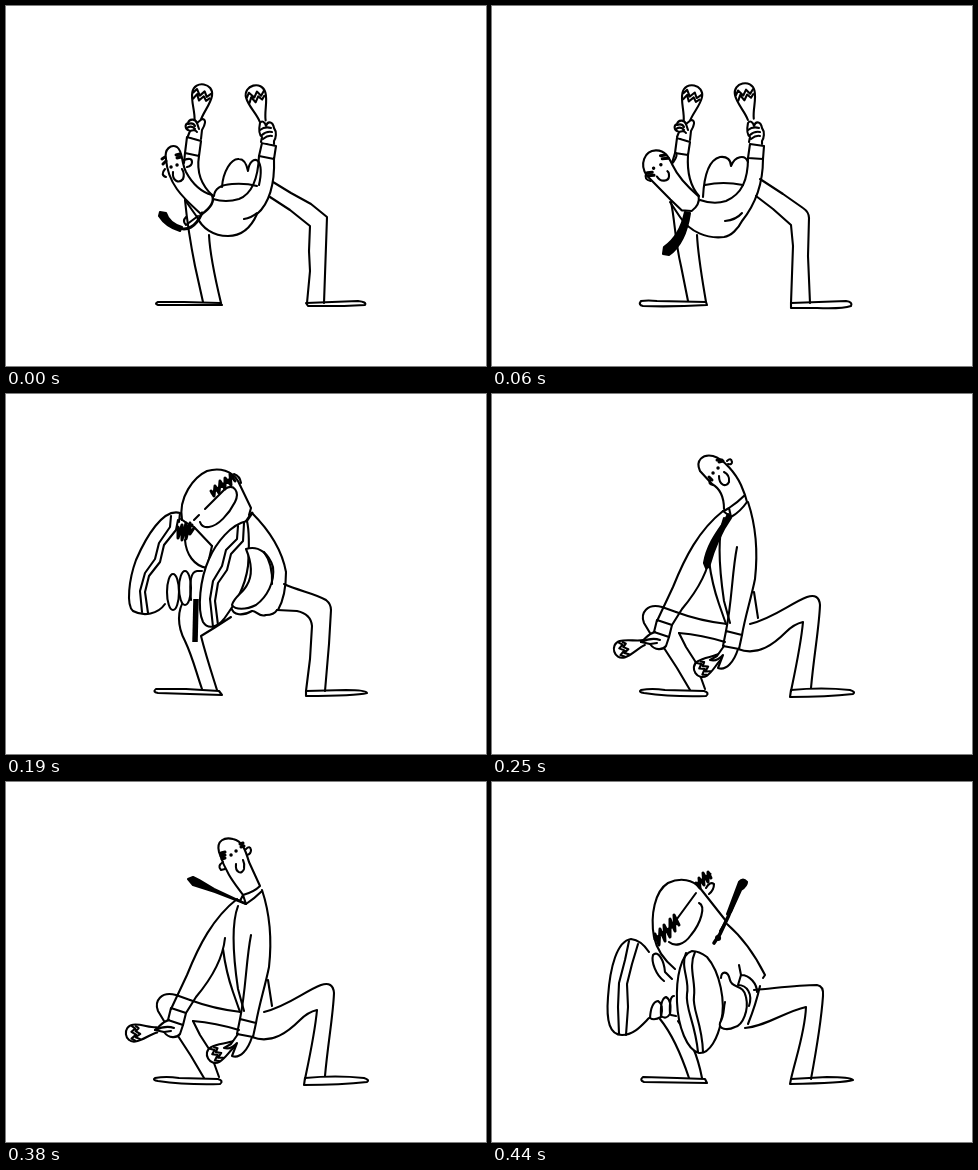
Recreate the animation shown at these times as an HTML page without scripts. Size 480 by 360 pixels, loop 0.5 s.

```html
<!DOCTYPE html>
<html lang="en">
<head>
<meta charset="utf-8">
<title>Maraca dance</title>
<style>
  html, body { margin: 0; width: 100%; height: 100%; overflow: hidden; background: #fff; }
  svg { display: block; width: 100vw; height: 100vh; overflow: hidden; }
  path, ellipse { vector-effect: non-scaling-stroke; }
  .ink { fill: none; stroke: #000; stroke-width: 2.1; stroke-linecap: round; stroke-linejoin: round; }
  .solid { fill: #000; }
  .paper { fill: #fff; }
  .hair { stroke-width: 3; }
  .dot { stroke-width: 3.4; }

  /* Poses sit side by side; the strip jumps one stage width at a time. */
  .strip { animation: dance .5s step-end infinite; }
  @keyframes dance {
    0% { transform: translateX(0); }
    12% { transform: translateX(-480px); }
    26% { transform: translateX(-960px); }
    38% { transform: translateX(-1440px); }
    50% { transform: translateX(-1920px); }
    62% { transform: translateX(-2400px); }
    76% { transform: translateX(-2880px); }
    88%, 100% { transform: translateX(-3360px); }
  }
</style>
</head>
<body>
<svg viewBox="0 0 480 360" preserveAspectRatio="none">
  <defs>
    <g id="maraca">
      <path class="paper" d="M-3 26C-4 17-10 8-10-1C-10-14 10-14 10-1C10 8 4 17 3 26"/>
      <path d="M-9-1L-6-5L-2 1L2-4L5 1L9-3M-8 5L-5 0L-2 6L2 1L5 5L8 2"/>
    </g>

    <g id="fistL">
      <path class="paper" d="M182 130L184 125C178 123 179 118 182 117C183 113 189 112 191 117L196 113C201 113 199 119 196 124L195 133"/>
      <path d="M182 118Q187 116 189 120M181 122Q186 119 189 123M184 125Q189 123 191 126M191 117L193 123"/>
    </g>

    <g id="fistR">
      <path class="paper" d="M255 136L256 131C252 128 253 122 254 117C256 114 259 116 260 120C262 114 267 116 268 122C271 126 270 132 268 135L268 138"/>
      <path d="M254 124Q259 120 265 122M256 129Q260 125 266 126M257 133Q262 129 266 130"/>
    </g>

    <g id="lean">
      <path d="M149 295Q156 294 165 295L214 296L215 299Q180 301 151 300Q146 299 149 295Z"/>
      <path d="M299 297L354 295Q361 296 359 300Q350 303 325 302L299 302Z"/>
      <path d="M179 196C183 215 183 235 189 260L196 295M205 229C206 250 210 272 214 296"/>
      <path d="M268 173L291 188L311 202Q317 206 317 212L316 250L318 297M264 190L281 203L299 219L301 240L299 297"/>
      <path d="M211 191C212 171 216 154 228 151C235 150 239 154 239 160C243 150 253 148 256 156M213 179Q231 175 251 179"/>
      <path d="M271 153C271 180 262 200 250 215C246 223 239 230 232 231C215 233 198 226 188 211L178 196"/>
      <path d="M256 152C256 174 250 188 234 195Q222 199 208 194M250 207Q244 214 233 215"/>
      <path d="M258 138L272 140L271 153L256 152ZM185 132L198 136L196 149L183 147Z"/>
      <path d="M183 147L180 157M196 149C195 165 198 180 207 190"/>
    </g>

    <g id="leanHead">
      <path d="M190 205L178 195L153 173C144 162 149 148 160 147C170 146 174 154 178 161C184 172 194 181 206 190Q208 198 200 205L190 205"/>
      <path d="M152 171Q150 177 157 178M178 158Q183 150 180 148M163 173C167 179 175 177 175 172Q175 168 173 167"/>
      <path class="hair" d="M153 170L158 169M154 173L160 172M165 152L170 151M167 155L173 154"/>
      <path class="dot" d="M159 165h.1M166 161h.1"/>
    </g>

    <g id="squat">
      <path d="M149 296Q160 294 173 296L212 297Q218 299 214 302Q180 303 152 299Q146 298 149 296Z"/>
      <path d="M299 296Q330 293 358 296Q364 298 361 300Q335 303 298 303Z"/>
      <path d="M184 218L170 213C155 209 148 219 152 229L158 239M172 254L185 274L198 296M187 239L194 253L203 267L213 295"/>
      <path d="M184 218Q208 227 235 230M187 239Q210 241 233 248"/>
      <path d="M258 230C282 224 299 209 315 203Q327 199 328 211C327 235 322 260 319 294"/>
      <path d="M246 255C266 263 283 249 294 238Q302 230 311 228C309 250 304 273 299 297"/>
      <path d="M231 117C207 136 193 163 181 193L165 227M219 156C217 176 206 196 190 215L180 231"/>
      <path d="M217 167Q220 190 227 210L234 230M232 124C224 145 228 180 232 207L238 229"/>
      <path d="M256 108C264 132 266 158 263 185C259 205 253 223 250 241M245 153C240 178 240 208 234 237M262 198L266 224"/>
    </g>

    <g id="lowHands">
      <path class="paper" d="M163 238C155 240 155 244 149 248L158 250C163 257 171 256 174 252L177 243"/>
      <path d="M149 248Q160 243 168 246M158 250L165 249"/>
      <path class="paper" d="M232 252L225 262L218 266Q225 268 231 261L226 274C234 277 242 268 246 255"/>
      <path d="M165 226L180 231L177 243L162 238ZM234 237L250 241L247 255L231 252Z"/>
    </g>

    <g id="upHead">
      <path d="M237 113C229 102 220 92 213 70C210 58 219 55 227 57C237 59 240 70 243 80L254 104M232 118L240 122Q249 116 256 109M237 113Q248 110 254 104M237 113L234 119M237 113L240 122"/>
      <path d="M217 80Q211 84 215 88L219 87M240 67Q244 63 245 68Q245 72 241 73M230 82C229 91 236 93 238 87Q239 82 237 78"/>
      <path class="hair" d="M215 71L219 70M215 74L219 73M216 77L219 76M234 62L237 61M235 65L238 64"/>
      <path class="dot" d="M225 73h.1M230 69h.1"/>
    </g>
  </defs>

  <g class="strip ink">
    <!-- leaning back, tie flung out -->
    <g>
      <path d="M152 296L178 296L214 297L216 299L152 299Q148 298 152 296Z"/>
      <path d="M300 297L352 295Q361 296 359 299L338 300L302 300Z"/>
      <path d="M179 194C181 215 184 235 189 260L197 296M203 229C204 250 209 272 215 297"/>
      <path d="M267 176L285 187L305 198L321 211L320 240L318 297M264 191L284 204L304 220L303 245L304 265L301 297"/>
      <path d="M216 181C217 166 225 152 233 153C239 153 241 160 242 165C243 156 248 152 252 155C256 160 255 170 253 179M208 190Q209 179 226 178Q240 177 251 180"/>
      <path d="M268 153C269 178 263 198 251 208C244 224 233 230 222 230C207 230 196 222 191 211L179 194"/>
      <path d="M253 150C252 173 246 188 233 193Q220 197 207 193M251 207Q245 212 238 213"/>
      <path d="M256 137L270 140L268 153L253 150ZM181 131L195 135L193 150L179 147Z"/>
      <path d="M179 147L178 157M193 150C190 168 196 180 207 190"/>
      <use href="#maraca" transform="translate(196 89) rotate(10)"/>
      <use href="#maraca" transform="translate(250 90) rotate(-15)"/>
      <use href="#fistL"/>
      <use href="#fistR"/>
      <path d="M195 208C180 194 162 180 160 153C158 143 165 138 171 141C177 145 175 156 180 166C186 177 195 186 206 189"/>
      <path d="M159 163Q154 169 160 171M178 154Q186 151 186 156Q186 160 181 161M167 166C166 175 173 178 177 173Q179 168 176 163"/>
      <path class="hair" d="M156 153L159 151M157 158L160 155M170 149L174 148M171 152L175 151"/>
      <path class="dot" d="M165 161h.1M171 159h.1"/>
      <path d="M206 189Q210 198 196 208" stroke-width="2.5"/>
      <path d="M180 211Q176 215 180 219L192 210"/>
      <path d="M196 207C190 221 181 226 170 221" stroke-width="3"/>
      <path class="solid" d="M154 206L160 207Q163 217 176 221L174 225Q160 221 153 210Z"/>
    </g>

    <!-- leaning back, tie falling -->
    <g transform="translate(480)">
      <use href="#lean"/>
      <use href="#maraca" transform="translate(200 90) rotate(12)"/>
      <use href="#maraca" transform="translate(253 88) rotate(-13)"/>
      <use href="#fistL" x="3" y="1"/>
      <use href="#fistR" x="2"/>
      <use href="#leanHead" transform="rotate(4 200 200)"/>
      <path class="solid" d="M193 206L198 207C195 227 188 241 177 249L171 248L172 241C184 233 190 220 193 206Z"/>
    </g>

    <!-- leaning back, tie hanging -->
    <g transform="translate(960)">
      <use href="#lean"/>
      <use href="#maraca" transform="translate(205 91) rotate(18)"/>
      <use href="#maraca" transform="translate(256 87) rotate(-7)"/>
      <use href="#fistL" x="4" y="1"/>
      <use href="#fistR" x="3"/>
      <use href="#leanHead"/>
      <path class="solid" d="M193 205L196 206L197 225L199 256L196 262L191 256L193 225Z"/>
    </g>

    <!-- swinging forward, maracas close up -->
    <g transform="translate(1440)">
      <path d="M150 295L180 295L213 297L216 301L152 299Q146 298 150 295Z"/>
      <path d="M300 297L340 296Q360 296 361 299Q350 302 300 302Z"/>
      <path d="M179 205C171 216 171 232 179 247C187 264 190 278 196 295M195 242C200 262 206 280 211 296M195 242L208 234L225 223"/>
      <path d="M278 190C293 197 308 199 320 206Q325 210 325 216L323 250L319 297M271 216L291 217Q305 220 306 232L304 265L300 297"/>
      <path d="M225 213C227 222 237 222 246 217C250 216 253 224 260 221Q268 221 271 216"/>
      <path d="M246 119C263 136 276 156 280 178Q280 202 272 216"/>
      <path d="M246 119L235 135" stroke-width="3"/>
      <path d="M176 126C172 103 188 83 201 77C214 73 226 77 232 87L245 114L243 121"/>
      <path d="M188 126L193 121M199 115L219 95C228 89 234 98 229 108C223 120 212 132 203 133Q196 134 194 128M228 80Q234 82 235 89M175 125Q181 130 188 133L206 152"/>
      <path class="hair" d="M205 97L208 102L209 92L213 99L214 87L219 95L219 84L225 91L224 80L229 87M206 99L227 83M172 133L172 144L176 131L176 146L180 129L180 145L184 129L184 140L188 134M173 136L186 131"/>
      <path d="M174 119C157 114 140 143 130 166C123 185 120 211 127 217C138 223 152 220 159 210M174 119L173 128M179 146C180 160 188 172 201 174M201 174L206 152"/>
      <path d="M165 122L164 133L153 149L149 165L139 179L134 197L136 218M172 126L170 136L158 151L154 168L143 182L139 198L142 219"/>
      <ellipse class="paper" cx="167" cy="198" rx="6" ry="18"/>
      <ellipse class="paper" cx="179" cy="194" rx="6" ry="17"/>
      <path d="M185 206Q182 178 191 177L196 177"/>
      <path d="M190 205L189 248" stroke-width="5.5" stroke-linecap="butt"/>
      <path class="paper" d="M241 127C225 130 210 149 203 165C194 185 191 215 197 228C202 236 212 233 218 225C228 211 239 195 242 172C243 157 244 140 241 127Z"/>
      <path d="M232 132L231 145L220 156L216 172L207 187L204 205L207 233M238 129L237 147L225 160L221 176L212 189L209 207L212 231"/>
      <path class="paper" d="M240 155C253 151 263 160 267 173C269 188 261 203 250 211C240 216 229 216 226 211C228 203 237 199 241 191C247 181 245 167 240 155Z"/>
      <path d="M258 158Q267 170 266 190"/>
    </g>

    <!-- squatting, tie down -->
    <g transform="translate(1920)">
      <use href="#squat"/>
      <use href="#maraca" transform="translate(131 255) rotate(-107) scale(.85)"/>
      <use href="#maraca" transform="translate(211 274) rotate(-124) scale(.85)"/>
      <use href="#lowHands"/>
      <path d="M232 115C232 103 229 95 220 90L208 77C203 66 211 60 221 62C232 65 244 80 249 91L253 101M231 117L239 123Q248 118 255 108L253 101Q246 108 237 114L232 117M237 114L239 123"/>
      <path d="M219 85Q215 90 221 91M235 67Q239 63 240 68Q240 71 236 70M227 82C227 91 234 94 237 88Q238 81 232 78"/>
      <path class="hair" d="M225 66L230 66M227 68L231 67M217 83L220 86"/>
      <path class="dot" d="M221 79h.1M226 74h.1"/>
      <path class="solid" d="M236 120L239 124C229 138 222 155 217 173L214 174L212 169C215 151 225 138 232 128Z"/>
    </g>

    <!-- squatting, tie rising -->
    <g transform="translate(2400)">
      <use href="#squat"/>
      <use href="#maraca" transform="translate(130 253) rotate(-103) scale(.85)"/>
      <use href="#maraca" transform="translate(211 273) rotate(-122) scale(.85)"/>
      <use href="#lowHands"/>
      <use href="#upHead" transform="rotate(-5 242 118)"/>
      <path class="solid" d="M236 119L240 123C218 126 202 133 187 143L181 142L182 136C199 126 217 122 236 119Z"/>
    </g>

    <!-- squatting, tie up -->
    <g transform="translate(2880)">
      <use href="#squat"/>
      <use href="#maraca" transform="translate(129 251) rotate(-98) scale(.85)"/>
      <use href="#maraca" transform="translate(210 272) rotate(-120) scale(.85)"/>
      <use href="#lowHands"/>
      <use href="#upHead"/>
      <path class="solid" d="M240 122L209 110L187 103L182 97L187 95L193 98L208 107Z"/>
    </g>

    <!-- swinging back, maracas close up -->
    <g transform="translate(3360)">
      <path d="M151 295L185 296L213 297L215 301L152 300Q147 298 151 295Z"/>
      <path d="M299 297L335 295Q358 295 361 298Q352 301 298 302Z"/>
      <path d="M168 237C181 253 190 275 197 296M186 239C198 255 206 275 210 296"/>
      <path d="M262 208C285 206 306 203 325 203Q332 204 331 214C329 242 324 270 319 297M253 246C275 244 292 230 314 225C313 250 304 275 299 297"/>
      <path d="M235 142C250 155 263 173 273 193L271 196M268 204Q264 222 256 242"/>
      <path d="M183 187C172 178 165 169 162 155C158 133 163 109 176 101C189 95 201 98 208 106L234 139L228 149"/>
      <path d="M214 106Q218 99 222 102Q222 108 217 112M182 141L204 111M207 121C214 124 209 141 199 153C192 163 183 165 177 160"/>
      <path class="hair" d="M163 152L167 163L168 147L173 159L172 143L178 155L178 137L183 149L182 133L187 143M163 157L185 141M204 101L208 106L207 96L212 103L211 91L216 100L216 90L219 96M205 102L218 92"/>
      <path d="M222 161L228 152L236 135L246 110" stroke-width="3.6"/>
      <path class="solid" d="M244 108L247 100Q251 95 255 100Q255 104 249 108L239 130L235 132Z"/>
      <path d="M226 156h.1" stroke-width="6"/>
      <path d="M139 157C125 159 118 185 116 215C114 240 118 253 130 253C142 253 150 243 157 236M139 157Q149 158 157 170"/>
      <path d="M137 159L133 178L127 201L126 225L127 252M146 162L140 182L135 202L136 225L134 253"/>
      <path d="M172 199C164 193 159 180 161 173C166 168 172 178 173 190L180 197"/>
      <path class="paper" d="M158 236Q159 220 166 219Q172 222 169 235Q162 239 158 236ZM169 234Q168 217 174 215Q180 218 178 232Q174 238 169 234Z"/>
      <path d="M178 232Q177 214 182 214M179 233L184 234"/>
      <path class="paper" d="M200 169C189 172 184 195 185 220C186 245 195 268 207 271C218 272 226 255 229 240C234 220 228 190 215 175Q207 169 200 169Z"/>
      <path d="M194 171C188 185 198 198 195 212C193 226 203 240 206 270M203 170C196 185 204 200 202 214C200 228 210 240 211 270"/>
      <path class="paper" d="M229 196C229 189 236 188 238 198C240 207 252 202 254 215C257 228 251 243 243 245C235 249 226 247 228 241C233 232 231 227 233 220"/>
      <path d="M247 183L249 193C258 193 265 202 265 210M249 193L246 203C255 203 261 212 257 224"/>
    </g>
  </g>
</svg>
</body>
</html>
```
